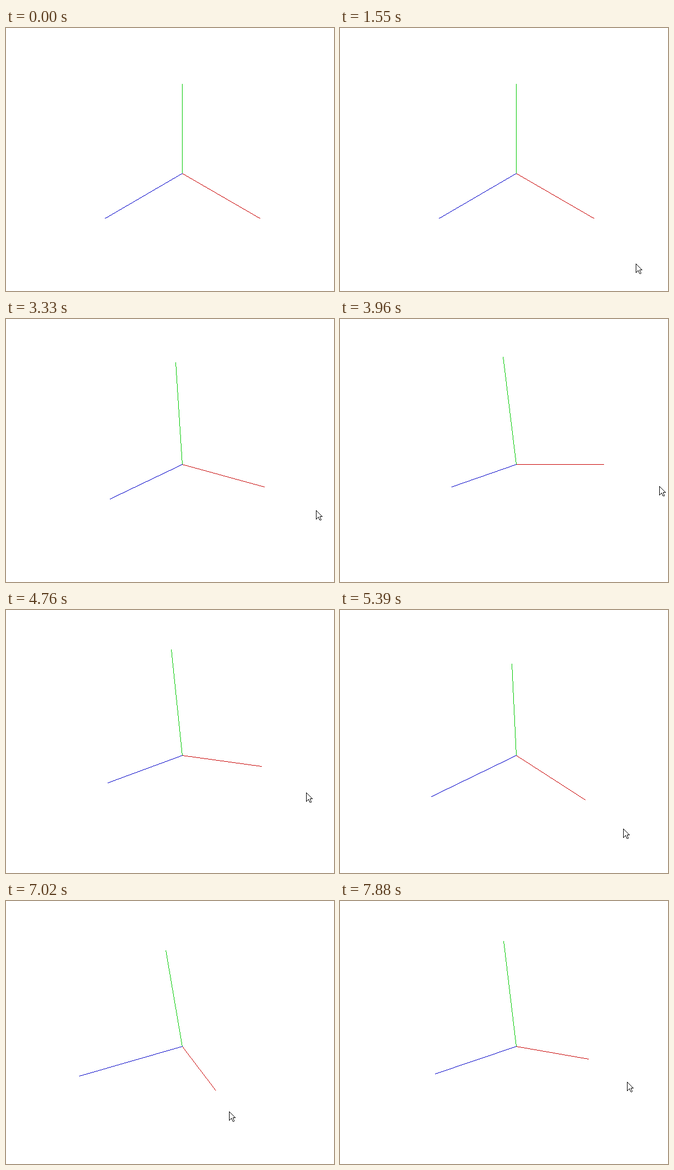
A matplotlib script for the animation above (8 s loop, 600 px wide and 480 px high).

```python
import numpy as np
import matplotlib.pyplot as plt
from matplotlib.animation import FuncAnimation

W, H, DPI = 600, 480, 100
LOOP, TICK = 8000, 20

ORIGIN = np.array([322.4, 265.0])
LENGTH = 200
RED, GREEN, BLUE, BLACK = (200, 0, 0), (0, 200, 0), (0, 0, 200), (0, 0, 0)

# Isometric view: columns are the x, y and z axes on screen
r2, r3, r6 = np.sqrt([2, 3, 6])
ISO = np.array([[1 / r2, 0, -1 / r2],
                [-1 / r6, 2 / r6, -1 / r6],
                [1 / r3, 1 / r3, 1 / r3]])

# Trackball under the pointer, in stage pixels
BALL = np.array([463, 346])
RADII = np.array([320, 200])

ARROW = [(0, 0), (0, 16), (4, 12), (6, 17), (8, 18), (9, 17),
         (7, 12), (7, 11), (11, 11), (0, 0)]


def linear(u):
    return u


def smooth(u):
    return u * u * (3 - 2 * u)


def glide(u):
    return np.sin(u * np.pi / 2)


def dash(u):
    return 1 - (1 - u) ** 2


# Pointer moves: first step, last step, number of steps, goal, easing in x and y
START = (518, 473)
MOVES = [
    (770, 1230, 7, (541, 442), smooth, smooth),
    (1400, 1550, 3, (541, 430), linear, linear),
    (2160, 2700, 8, (554, 403), smooth, smooth),
    (2930, 4200, 17, (590, 301), linear, glide),
    (4430, 5390, 13, (518, 399), glide, smooth),
    (5770, 6550, 11, (361, 388), smooth, smooth),
    (6938, 7880, 13, (525, 330), dash, smooth),
]
ENTER = MOVES[0][0]
GRAB, GRAB_AT = MOVES[3][0], MOVES[2][3]


def pointer_at(t, lag=0):
    """Pointer tip at time t, some steps late if lag is given."""
    pos = np.array(START, float)
    for first, last, steps, goal, ease_x, ease_y in MOVES:
        if t < first:
            break
        step = int((t - first) * (steps - 1) / (last - first) + 1e-6) + 1
        u = min((step - lag) / steps, 1)
        pos += (np.array(goal) - pos) * (ease_x(u), ease_y(u))
    return pos


def on_ball(pos):
    x, y = (pos - BALL) / RADII
    return np.array([x, -y, np.sqrt(max(1 - x * x - y * y, 0))])


def rotation(a, b):
    """Shortest turn that carries unit vector a to b."""
    x, y, z = np.cross(a, b)
    k = np.array([[0, -z, y], [z, 0, -x], [-y, x, 0]])
    return np.eye(3) + k + k @ k / (1 + a @ b)


def stroke(canvas, start, end, color):
    """One pixel wide line without smoothing."""
    (x0, y0), (x1, y1) = np.rint(start), np.rint(end)
    count = int(max(abs(x1 - x0), abs(y1 - y0))) + 1
    x = np.rint(np.linspace(x0, x1, count)).astype(int)
    y = np.rint(np.linspace(y0, y1, count)).astype(int)
    inside = (x >= 0) & (x < W) & (y >= 0) & (y < H)
    canvas[y[inside], x[inside]] = color


def render(t):
    canvas = np.full((H, W, 3), 255, np.uint8)
    axes = LENGTH * ISO
    if t >= GRAB:
        axes = rotation(on_ball(GRAB_AT), on_ball(pointer_at(t, 0.5))) @ axes
    for (x, y, _), color in zip(axes.T, (RED, GREEN, BLUE)):
        stroke(canvas, ORIGIN, ORIGIN + (x, -y), color)
    if t >= ENTER:
        tip = np.rint(pointer_at(t))
        for a, b in zip(ARROW, ARROW[1:]):
            stroke(canvas, tip + a, tip + b, BLACK)
    return canvas


fig = plt.figure(figsize=(W / DPI, H / DPI), dpi=DPI, facecolor="white")
ax = fig.add_axes([0, 0, 1, 1])
ax.axis("off")
picture = ax.imshow(render(0), interpolation="nearest", aspect="auto")


def draw(i):
    picture.set_data(render(i * TICK + TICK / 2))
    return [picture]


anim = FuncAnimation(fig, draw, frames=LOOP // TICK, interval=TICK,
                     repeat=True, repeat_delay=0, blit=False)
plt.show()
```
